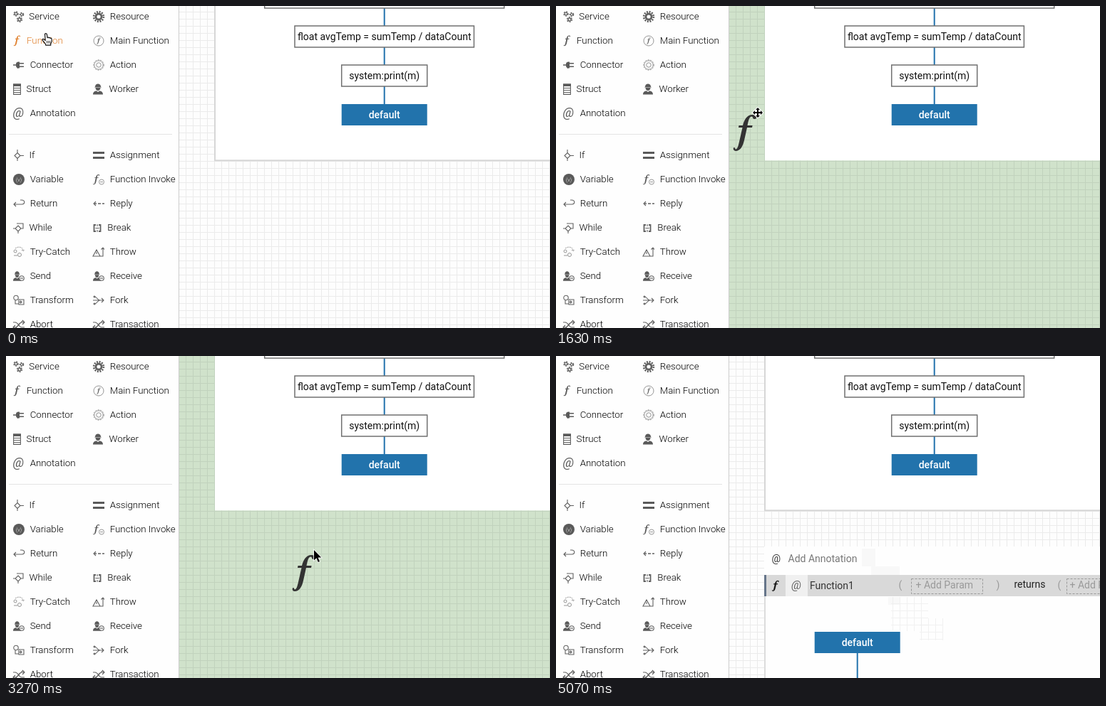
Write an HTML page that moves like this. It is 763x453 px and loops after 7.39 s.

```html
<!DOCTYPE html>
<html lang="en">
<head>
<meta charset="utf-8">
<title>Drag a function onto the canvas</title>
<style>
html, body { margin: 0; width: 100%; height: 100%; overflow: hidden; background: #fff; }
svg { display: block; width: 763px; height: 453px; font: 14px Roboto, Arial, sans-serif; }
.palette { font-size: 13.3px; font-weight: 300; fill: #000; }
.icon { fill: none; stroke: #606060; stroke-width: 1.1; }
.icon .solid { fill: #5a5a5a; stroke: none; }
.icon .teeth { stroke-dasharray: 2 1.6; }
.icon .faint { stroke: #8a8a8a; stroke-width: .9; }
.hot { fill: #e0812f; }
.hot .solid { fill: #e0812f; }
.node { fill: #fff; stroke: #707070; stroke-width: 1.5; }
.wire { stroke: #2272ad; stroke-width: 2; }
.block { fill: #2273ac; }
.mid { text-anchor: middle; fill: #111; }
.title { text-anchor: middle; fill: #fff; font-weight: 500; }
.tint { mix-blend-mode: multiply; }
#accept, #reject, #added, #drag, #ban, .cursor, #trail > * { display: none; }
.ok #accept, .bad #reject, .bad #ban, .done #added, .ok #drag, .bad #drag { display: inline; }
.ok .frame { stroke: none; }
.bad .frame { fill: none; stroke: #f0f0f0; }
#drag { fill: #333; }
.bad #glyph { fill: #555; opacity: .3; }
.muted { fill: #999; }
.slot { fill: none; stroke: #999; stroke-dasharray: 3 2; }
</style>
</head>
<body>
<svg id="stage" viewBox="0 0 763 453">
  <defs>
    <pattern id="grid" x="243" y="9" width="10" height="10" patternUnits="userSpaceOnUse">
      <path d="M9.5 0V10M0 9.5H10" stroke="#ebebeb"/>
    </pattern>
    <path id="f" d="M33 4C33 1 30 0 27 0C20 0 16 7 14 15H8.5L8 18H13.5L9 38C7.5 45 6 48.5 4 48.5C3 48.5 3.5 46 2 46C0 46 0 51 4 51C10 51 14 45 16 36L20 18H27L27.6 15H20.5C22 7 23.5 2.5 26.5 2.5C28.5 2.5 27.5 6 30 6C32 6 33 5.5 33 4Z"/>
  </defs>

  <rect x="243" width="520" height="453" fill="#fdfdfd"/>
  <rect x="243" width="520" height="453" fill="url(#grid)"/>
  <rect id="accept" class="tint" x="243" width="520" height="453" fill="#d2e4cd"/>

  <rect class="frame" x="293" y="-5" width="480" height="222.3" fill="#fff" stroke="#d6d6d6" stroke-width="2"/>
  <rect id="reject" class="tint" x="292" width="471" height="218" fill="#f7d1ce"/>
  <path class="wire" d="M530.7 3V138"/>
  <rect class="node" x="362.7" y="-20" width="336" height="23"/>
  <rect class="node" x="405" y="28" width="251.4" height="30"/>
  <rect class="node" x="470.7" y="83" width="120" height="30"/>
  <rect class="block" x="470.7" y="138" width="120" height="30"/>
  <text class="mid" x="530.7" y="48">float avgTemp = sumTemp / dataCount</text>
  <text class="mid" x="530.7" y="103">system:print(m)</text>
  <text class="title" x="530.7" y="158">default</text>

  <g id="added">
    <rect x="292" y="268" width="471" height="185" fill="#fefefe"/>
    <path d="M293 338V453" stroke="#dcdcdc" stroke-width="2"/>
    <text x="302.5" y="290" fill="#333">@</text>
    <text x="325.5" y="290" fill="#777">Add Annotation</text>
    <rect x="293" y="308" width="470" height="30" fill="#d9d9d9"/>
    <rect x="292" y="308" width="3" height="30" fill="#66758a"/>
    <rect x="322" y="308" width="31" height="30" fill="#f0f0f0"/>
    <use href="#f" transform="translate(303 316) scale(.29)" fill="#111" stroke="#111"/>
    <text x="330" y="328" fill="#666" font-style="italic" font-size="16">@</text>
    <text x="356" y="328" fill="#333">Function1</text>
    <g class="muted">
      <text x="480.5" y="327">(</text>
      <text x="504.5" y="327">+ Add Param</text>
      <text x="617.5" y="327">)</text>
      <text x="703.5" y="327">(</text>
      <text x="720.5" y="327">+ Add Return Param</text>
    </g>
    <rect class="slot" x="498.5" y="313.5" width="100" height="21"/>
    <rect class="slot" x="716.5" y="313.5" width="120" height="21"/>
    <text x="642.5" y="326" fill="#222">returns</text>
    <rect class="block" x="362.7" y="388" width="120" height="30"/>
    <path class="wire" d="M422.7 418V453"/>
    <text class="title" x="422.7" y="408">default</text>
    <g id="trail">
      <path d="M429 271h19v25h-19z" fill="#f8f8f8"/>
      <path d="M442 296h40v12h-40zM466 339h16v11h-16z" fill="#f8f8f8"/>
      <path d="M470 339h52v48h-52z" fill="url(#grid)" opacity=".7"/>
      <path d="M510 369h33v31h-33z" fill="url(#grid)" opacity=".7"/>
    </g>
  </g>

  <rect width="242" height="453" fill="#fefefe"/>
  <path d="M242.5 0V453" stroke="#ccc"/>
  <path d="M4 180.5H233" stroke="#e4e4e4"/>
  <g id="palette" class="palette"></g>

  <g id="drag">
    <use id="glyph" href="#f"/>
    <g id="ban" fill="none" stroke="#e8452f" stroke-width="3">
      <circle cx="38" cy="50" r="8"/><path d="M32.5 44.5L43.5 55.5" transform="matrix(-1 0 0 1 76 0)"/>
    </g>
  </g>

  <g id="hand" class="cursor" stroke="#111" stroke-width="1.2" stroke-linejoin="round">
    <path fill="#fff" d="M4.5 1.7c0-1.5 2.5-1.5 2.8 0l.8 5c.5-1 2-.8 2.2.2c.7-.8 1.9-.4 2 .6c.8-.5 1.8 0 1.8 1v3.5l-1.4 3v2.2h-7l-.5-2-4-5c-.8-1.5.8-2.3 2-1.3l2 1.6z"/>
    <path d="M7.5 11v3.5M9.5 11v3.5M11.5 11v3.5" stroke-width=".8"/>
  </g>
  <path id="move" class="cursor" stroke="#fff" stroke-width="2" paint-order="stroke" d="M0-7L3-4H1V-1H4V-3L7 0L4 3V1H1V4H3L0 7L-3 4H-1V1H-4V3L-7 0L-4-3V-1H-1V-4H-3Z"/>
  <path id="arrow" class="cursor" stroke="#fff" stroke-width="1.6" paint-order="stroke" d="M0 0V14.5L3.4 11.3L5.8 17L8 16L5.6 10.6H10.2Z"/>
</svg>
<script>
const $ = id => document.getElementById(id);

// Icon parts, drawn in a 16 by 16 box
const line = (d, attrs = '') => `<path d="${d}" ${attrs}/>`;
const solid = d => line(d, 'class="solid"');
const ring = (x, y, r, attrs = '') => `<circle cx="${x}" cy="${y}" r="${r}" ${attrs}/>`;
const gear = (x, y, r, w = 1.5) =>
  ring(x, y, r, `stroke-width="${w}"`) + ring(x, y, r + w, `class="teeth" stroke-width="${w}"`);
const smallF = (x, y, s) =>
  `<use href="#f" class="solid" transform="translate(${x} ${y}) scale(${s})"/>`;
const person = solid('M3 4.5C3-1 11-1 11 4.5L12 5.5H2ZM3.5 6H10.5C10.5 11.5 3.5 11.5 3.5 6ZM0 15.5C0 11.5 3 10.5 5 10.5L7 12L9 10.5C11 10.5 14 11.5 14 15.5Z');
const messenger = `<g transform="translate(0 1) scale(.8 .88)">${person}</g>` +
  ring(12, 11, 3.3, 'fill="#fefefe"') + line('M10 11H14');
const swap = line('M0 5H3C7 5 8 12 12 12H16M0 12H3C7 12 8 5 12 5H16M13 2L16 5L13 8M3 9L0 12L3 15M3 14L13 3');

const icons = {
  Service: gear(4, 4, 1.8, 1.3) + gear(12, 5, 1.5, 1.2) + gear(9, 12, 2, 1.4),
  Resource: gear(8, 8, 4, 2.8),
  Function: smallF(0.5, 0.5, .29),
  'Main Function': ring(8, 8, 7, 'class="faint"') + smallF(5, 3.5, .18),
  Connector: solid('M0 7.2H4C4 4 6 3.5 9 3.5V5H15V6.5H9V9.5H15V11H9V12.5C6 12.5 4 12 4 8.8H0Z'),
  Action: ring(8, 8, 6.2, 'class="faint"') + ring(8, 8, 7.2, 'class="faint teeth"') + ring(8, 8, 3.2, 'class="faint"'),
  Struct: line('M.6 1H10.4V15.4H.6ZM1 6.5H10M1 9.5H10M1 12.5H10') + solid('M0 .5H11V4H0Z'),
  Worker: person,
  Annotation: '<text class="solid" x="-.5" y="13" font-size="18" font-weight="400" font-style="italic">@</text>',
  If: line('M6 4.5L10 8.5L6 12.5L2 8.5ZM6 0V4.5M6 12.5V16M10 8.5H15'),
  Assignment: solid('M0 3H16V6H0ZM0 10H16V13H0Z'),
  Variable: ring(8, 8, 8, 'class="solid"') +
    '<text x="8" y="10.5" font-size="7" text-anchor="middle" fill="#fff" stroke="none">(v)</text>',
  'Function Invoke': smallF(0, 1, .28) + ring(12, 11.5, 3.5, 'class="faint"') + line('M10 11.5H14', 'class="faint"'),
  Return: line('M4 6L1 9L4 12M1 9H12C17 9 17 3 12 3H10'),
  Reply: line('M4 5L1 8L4 11') + line('M1 8H16', 'stroke-dasharray="4 2" stroke-width="1.6"'),
  While: line('M7 5L11 9L7 13L3 9ZM7 13V16M5 2H14V9H11M3 9H0'),
  Break: line('M4 4H1.5V13H4M8 4H10.5V13H8', 'stroke-width="1.8"') + line('M6 3V6M6 11V14M3.5 8.5H8.5'),
  'Try-Catch': line('M3 3C8-1 15 2 14 7M12 5L14 7L16 5', 'class="faint" stroke-dasharray="2 1"') +
    ring(3, 7, 2, 'class="faint"') + ring(9, 12, 2.5, 'class="faint"') + line('M1 13H6', 'class="faint"'),
  Throw: line('M5 5L10 14H0ZM5 8V11M10 14H14V2M11.5 4.5L14 2L16 4.5'),
  Send: messenger,
  Receive: messenger,
  Transform: ring(4, 4.5, 3.2) + line('M3 8V13H8M8 7H15V14H8ZM8 10.5H12M10 8.5L12 10.5L10 12.5'),
  Fork: line('M0 8H15M12 5L15 8L12 11M2 3C6 3 6 8 10 8M2 13C6 13 6 8 10 8') + ring(2, 3, 1) + ring(2, 13, 1),
  Abort: swap,
  Transaction: swap
};

// Top group, then lower group; each row holds the left and right entry
const groups = [
  [14, 'Service,Resource|Function,Main Function|Connector,Action|Struct,Worker|Annotation'],
  [209, 'If,Assignment|Variable,Function Invoke|Return,Reply|While,Break|Try-Catch,Throw|Send,Receive|Transform,Fork|Abort,Transaction']
];
const indent = { Service: 22.3, Function: 19, Struct: 18.5, If: 22.5, While: 22.5, Worker: 22.5, Break: 20.3 };

$('palette').innerHTML = groups.map(([top, rows]) =>
  rows.split('|').map((row, r) => row.split(',').map((name, col) => {
    const left = col ? 122 : 10, y = top + r * 34;
    const id = name === 'Function' ? 'id="source"' : '';
    return `<g ${id}><g class="icon" transform="translate(${left} ${y - 7})">${icons[name]}</g>` +
      `<text x="${left + (indent[name] || 23.7)}" y="${y + 5}">${name}</text></g>`;
  }).join('')).join('')).join('');

// time, mode, cursor, cursor x, y, dragged glyph x, y
const steps = [
  [0, 'idle', 'hand', 50, 38],
  [140, 'idle', 'hand', 42, 42],
  [290, 'idle', 'hand', 41, 43],
  [440, 'idle', 'hand', 40, 45],
  [1330, 'idle', 'hand', 54, 46],
  [1480, 'idle', 'hand', 212, 110],
  [1630, 'ok', 'move', 283, 150, 248, 153],
  [1780, 'bad', 'move', 335, 184, 303, 188],
  [1930, 'bad', 'move', 341, 197, 303, 188],
  [2080, 'ok', 'move', 392, 250, 355, 250],
  [2230, 'ok', 'move', 413, 260, 373, 262],
  [2380, 'ok', 'move', 430, 272, 395, 276],
  [2530, 'ok', 'move', 433, 275, 401, 280],
  [3270, 'ok', 'arrow', 432, 273, 401, 280],
  [3570, 'done', 'arrow', 432, 273],
  [4320, 'done', 'arrow', 437, 283],
  [4470, 'done', 'arrow', 470, 332],
  [4620, 'done', 'arrow', 510, 369],
  [4770, 'done', 'arrow', 530, 381],
  [4920, 'done', 'arrow', 531, 381],
  [5070, 'done', 'none']
];
const LOOP = 7390;
const trailStart = 4320, trailGap = 150;
const trail = [...$('trail').children];
const cursors = [...document.querySelectorAll('.cursor')];
const start = performance.now();
let shown;

function show(step) {
  const [time, mode, cursor, x, y, fx = 0, fy = 0] = step;
  $('stage').setAttribute('class', mode);
  $('source').setAttribute('class', mode === 'idle' ? 'hot' : '');
  $('drag').setAttribute('transform', `translate(${fx} ${fy})`);
  for (const c of cursors) {
    c.style.display = c.id === cursor ? 'inline' : 'none';
    if (c.id === cursor) c.setAttribute('transform', `translate(${x} ${y})`);
  }
  trail.forEach((patch, i) => {
    patch.style.display = time >= trailStart + i * trailGap ? 'inline' : 'none';
  });
}

function tick() {
  const t = Math.max(0, performance.now() - start) % LOOP;
  const step = steps.findLast(s => s[0] <= t);
  if (step !== shown) show(shown = step);
  requestAnimationFrame(tick);
}
tick();
</script>
</body>
</html>
```
